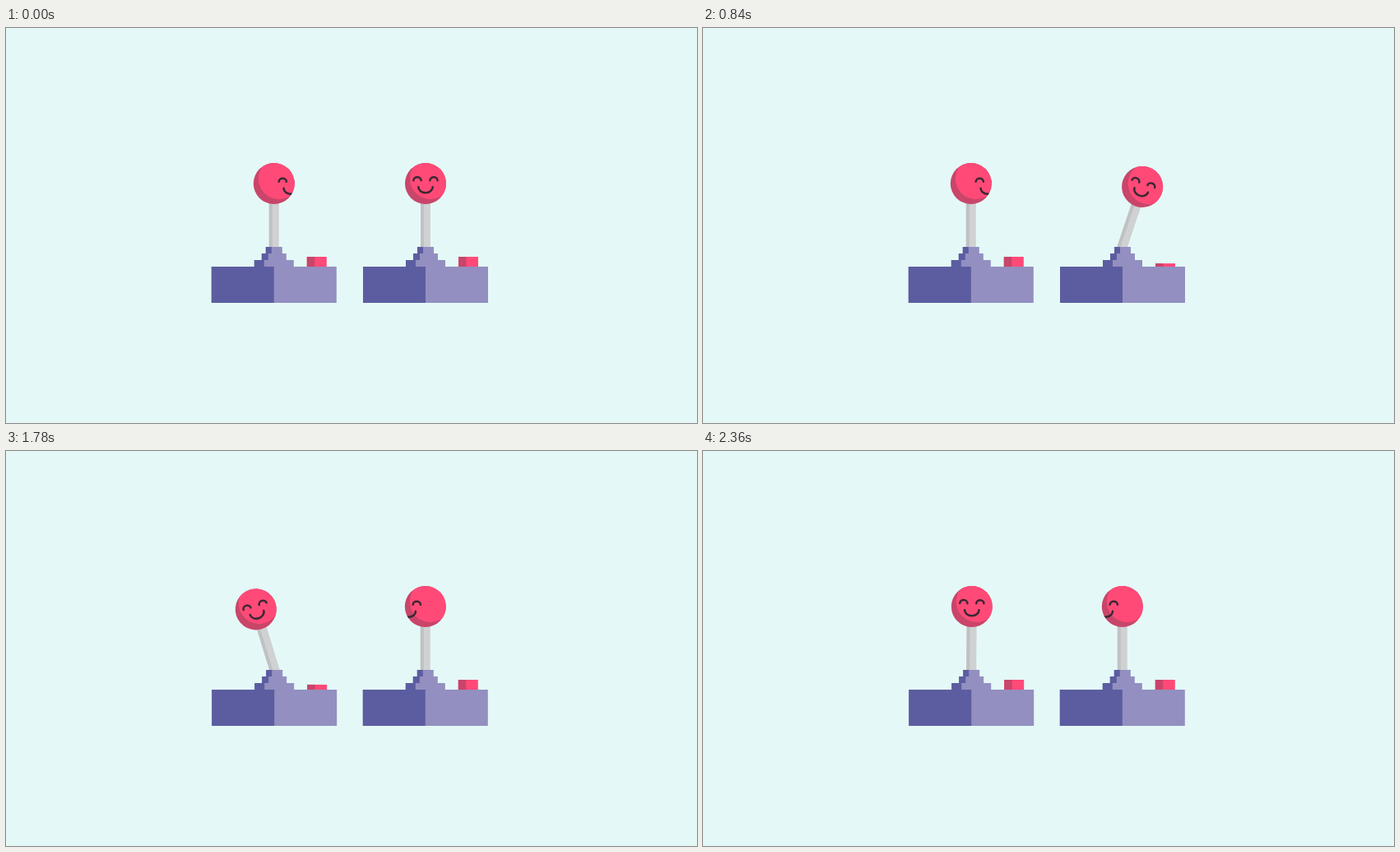
Write an HTML page that moves like this. It is 840 px wide and 480 px high and loops after 2.42 s.

```html
<!DOCTYPE html>
<html lang="en">
<head>
<meta charset="utf-8">
<title>Joysticks</title>
<style>
  html, body { margin: 0; width: 100%; height: 100%; overflow: hidden; background: #e4f9f7; }
  svg { display: block; width: 840px; height: 480px; }
  .dark { fill: #5c5da0; }
  .light { fill: #938fc0; }
  .face { fill: none; stroke: #3a2833; stroke-width: 2.5; stroke-linecap: round; }
</style>
</head>
<body>
<svg viewBox="0 0 840 480">
  <defs>
    <clipPath id="ball"><circle r="25"/></clipPath>
    <g id="base">
      <path class="light" d="M-10 266h20v8h5v8h9v8h52v44h-152v-44h52v-8h9v-8h5z"/>
      <path class="dark" d="M-10 266h7v8h-4v8h-5v8h12v44h-76v-44h52v-8h9v-8h5z"/>
    </g>
  </defs>
</svg>
<script>
const LOOP = 2420, TURN = 1200, PIVOT_Y = 265, STICK = 76;

// [time in ms, value], eased between neighbours
const TILT = [[0, 0], [120, 0], [360, 38], [480, 13.2], [720, -29.5], [960, 30], [1200, 0]];
const PRESS = [[0, 0], [120, 10], [240, 10], [480, 0], [540, 0], [660, 10], [720, 0], [960, 10], [1160, 0]];

// cubic-bezier(.25, .1, .25, 1)
function ease(x) {
  let lo = 0, hi = 1;
  for (let i = 0; i < 20; i++) {
    const s = (lo + hi) / 2;
    if (.75 * s * (1 - s) + s ** 3 < x) lo = s; else hi = s;
  }
  return .3 * lo * (1 - lo) ** 2 + 3 * lo * lo * (1 - lo) + lo ** 3;
}

function valueAt(keys, t) {
  const i = keys.findIndex(key => key[0] > t);
  if (i < 0) return keys[keys.length - 1][1];
  const [t0, a] = keys[i - 1], [t1, b] = keys[i];
  return a + (b - a) * ease((t - t0) / (t1 - t0));
}

function makeJoystick(x, idleX, lookX) {
  const root = document.createElementNS('http://www.w3.org/2000/svg', 'g');
  root.innerHTML = `
    <g class="lever">
      <path fill="#d0d1d3" d="M-6 196h12v74h-12z"/>
      <path fill="#c0c1c3" d="M-6 196h4v74h-4z"/>
      <g transform="translate(0 ${PIVOT_Y - STICK})">
        <circle r="25" fill="#c9456a"/>
        <g clip-path="url(#ball)">
          <circle cx="6" cy="-6" r="25" fill="#ff4a77"/>
          <path class="face" d="M-14.6-3.8a4.6 4 0 0 1 9.2 0M5.4-3.8a4.6 4 0 0 1 9.2 0M-8.7 4.3a8.7 7 0 0 0 17.4 0"/>
        </g>
      </g>
    </g>
    <g class="button">
      <path fill="#ff4a77" d="M40 0h24v12h-24z"/>
      <path fill="#c9456a" d="M40 0h9.5v12h-9.5z"/>
    </g>
    <use href="#base"/>`;
  document.querySelector('svg').append(root);
  const [lever, button, face] = ['.lever', '.button', '.face'].map(s => root.querySelector(s));

  return (active, t) => {
    const tilt = active ? valueAt(TILT, t) : 0;
    const press = active ? valueAt(PRESS, t) : 0;
    root.setAttribute('transform', `translate(${active ? x : idleX} 0)`);
    lever.setAttribute('transform', `rotate(${tilt} 0 ${PIVOT_Y})`);
    button.setAttribute('transform', `translate(0 ${278 + press}) scale(1 ${1 - press / 12})`);
    face.setAttribute('transform', active ? '' : `translate(${lookX} 1.5)`);
  };
}

const left = makeJoystick(326.2, 325.8, 20.5);
const right = makeJoystick(510, 509.8, -20.5);
const start = performance.now();

function draw(now) {
  const t = Math.max(0, now - start) % LOOP;
  right(t < TURN, t);
  left(t >= TURN, t - TURN);
  requestAnimationFrame(draw);
}
draw(start);
</script>
</body>
</html>
```
